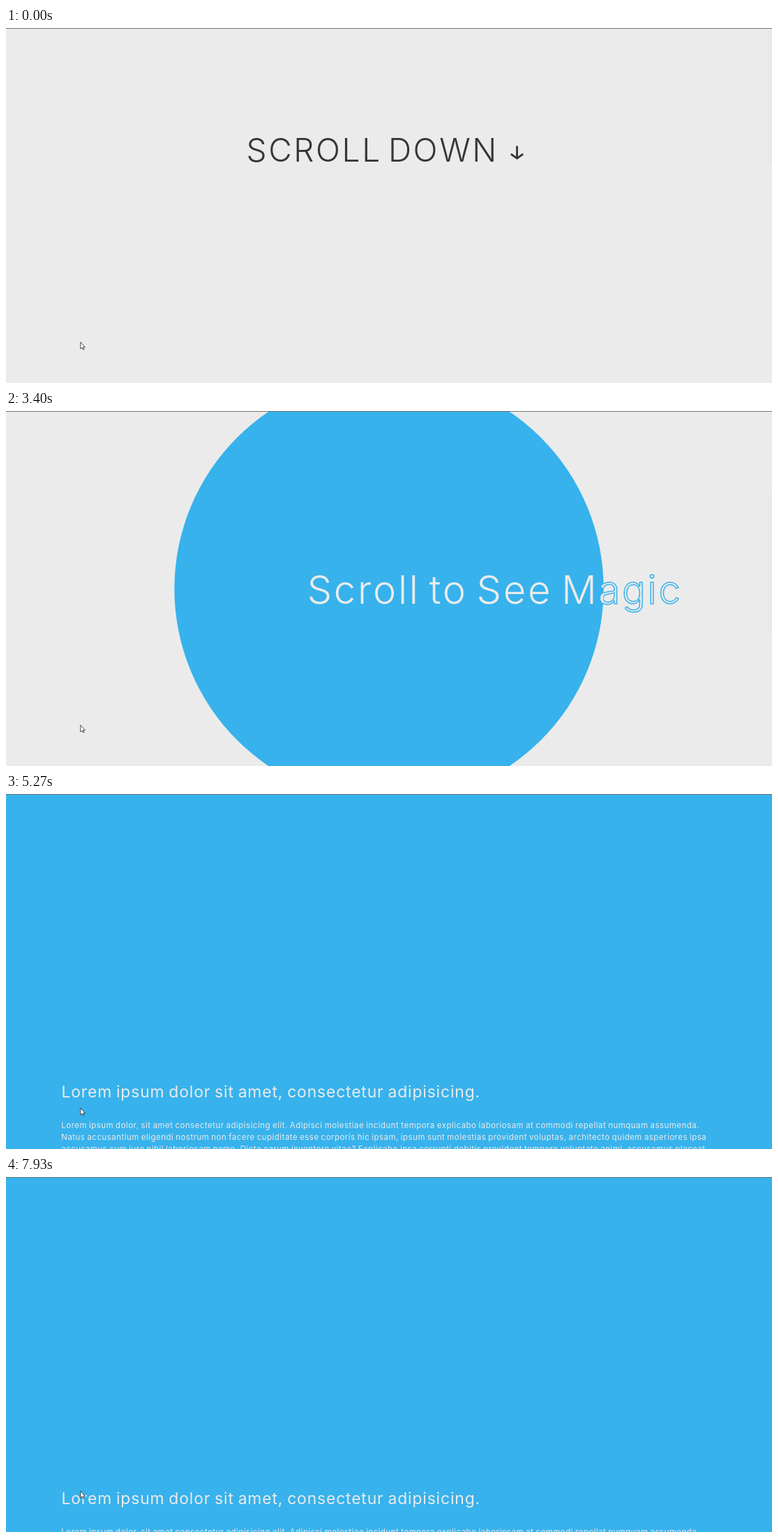
Animation, 1098 px wide and 510 px high, one loop 8 s. Source, as an HTML page:

```html
<!DOCTYPE html>
<html lang="en">
<head>
<meta charset="utf-8">
<title>Scroll reveal</title>
<style>
  :root { --paper: #ebebeb; --blue: #37b2ec; --ink: #363636; }
  html, body { margin: 0; width: 100%; height: 100%; overflow: hidden; background: var(--paper); }
  svg { display: block; }
  text { font-family: Inter, "Open Sans", sans-serif; font-optical-sizing: none; fill: var(--paper); }
  .title { font-size: 46px; font-weight: 300; letter-spacing: .057em; word-spacing: -.14em; fill: var(--ink); }
  .magic { font-size: 56px; font-weight: 300; letter-spacing: .05em; word-spacing: -.1em; }
  .outline { stroke: var(--blue); stroke-width: 1.5; }
  .heading { font-size: 22.9px; letter-spacing: .037em; word-spacing: -.06em; }
  .body { font-size: 11.44px; letter-spacing: .044em; word-spacing: -.06em; }
  .arrow { fill: none; stroke: var(--ink); stroke-width: 2.8; }
  .fill { fill: var(--blue); }
</style>
</head>
<body>
<svg width="1098" height="510" viewBox="0 0 1098 510">
  <clipPath id="hole"><circle class="disc" cx="549" cy="255.5" r="0"/></clipPath>
  <g id="intro">
    <text class="title" x="344.5" y="192">SCROLL DOWN</text>
    <path class="arrow" d="M732.5 169.500V187M723.800 181L732.500 187.300L741.200 181"/>
  </g>
  <text class="magic outline" y="276.500">Scroll to See Magic</text>
  <rect id="thumb" x="1091" width="7" height="195" fill-opacity=".01"/>
  <circle class="disc fill" cx="549" cy="255.5" r="0"/>
  <g clip-path="url(#hole)"><text class="magic" y="276.500">Scroll to See Magic</text></g>
  <g id="article">
    <text class="heading" x="79.5" y="296">Lorem ipsum dolor sit amet, consectetur adipisicing.</text>
  </g>
  <path d="M0 .5H1098" stroke="#737373"/>
  <path d="M106.800 451.200V461L109.100 459L110.600 462.200L112 461.500L110.500 458.400H113.300Z" fill="#fff" stroke="#222" stroke-width=".8"/>
</svg>
<script>
const STEP = 1000 / 15, STEPS = 120, MAX_SCROLL = 826;

// [step, scroll offset]
const keys = [
  [0, 0], [11, 0], [23, 146], [24, 158], [30, 199.5], [43, 199.5], [44, 200.3],
  [54, 336], [56, 336], [60, 350], [69, 481], [82, 745], [87, MAX_SCROLL],
  [104, MAX_SCROLL], [117, 671], [119, 652], [120, 643]
];

const lines = [
  "Lorem ipsum dolor, sit amet consectetur adipisicing elit. Adipisci molestiae incidunt tempora explicabo laboriosam at commodi repellat numquam assumenda.",
  "Natus accusantium eligendi nostrum non facere cupiditate esse corporis hic ipsam, ipsum sunt molestias provident voluptas, architecto quidem asperiores ipsa",
  "accusamus cum iure nihil laboriosam nemo. Dicta earum inventore vitae? Explicabo ipsa corrupti debitis provident tempore voluptate animi, accusamus placeat",
  "modi? Saepe ipsam, quidem commodi ipsum quaerat nisi ad! Expedita placeat saepe corporis quam fuga aperiam, quaerat totam inventore qui voluptatum",
  "nostrum laudantium pariatur perspiciatis consequatur labore optio illo architecto. Deleniti eveniet nam, ipsum sapiente provident modi a cumque dolorum",
  "consequuntur!"
];

const $ = id => document.getElementById(id);
const all = selector => document.querySelectorAll(selector);

lines.forEach((line, i) => {
  const text = document.createElementNS("http://www.w3.org/2000/svg", "text");
  text.setAttribute("class", "body");
  text.setAttribute("x", 79.3);
  text.setAttribute("y", 340.4 + i * 17.17);
  text.textContent = line;
  $("article").append(text);
});

const slopes = keys.slice(1).map(([t, s], i) => (s - keys[i][1]) / (t - keys[i][0]));

// Harmonic mean keeps the curve monotone between keys
function tangent(i) {
  const a = slopes[i - 1] ?? slopes[i], b = slopes[i] ?? a;
  return a * b > 0 ? 2 * a * b / (a + b) : 0;
}

function scrollAt(step) {
  const i = keys.findIndex(key => key[0] > step) - 1;
  const [t0, s0] = keys[i], [t1, s1] = keys[i + 1];
  const d = t1 - t0, u = (step - t0) / d, v = 1 - u;
  return s0 * v * v * (1 + 2 * u) + s1 * u * u * (3 - 2 * u)
    + d * u * v * (v * tangent(i) - u * tangent(i + 1));
}

function draw(now) {
  const step = Math.floor((now + 4) / STEP) % STEPS;
  const scroll = scrollAt(step);
  $("intro").setAttribute("transform", `translate(0 ${-scroll})`);
  $("article").setAttribute("transform", `translate(0 ${MAX_SCROLL - scroll})`);
  $("thumb").setAttribute("y", scroll * 0.385);
  all(".disc").forEach(disc => disc.setAttribute("r", scroll));
  all(".magic").forEach(text => text.setAttribute("x", 301.5 - 3.073 * (scroll - 350)));
}

function tick() {
  draw(performance.now());
  requestAnimationFrame(tick);
}
tick();
</script>
</body>
</html>
```
